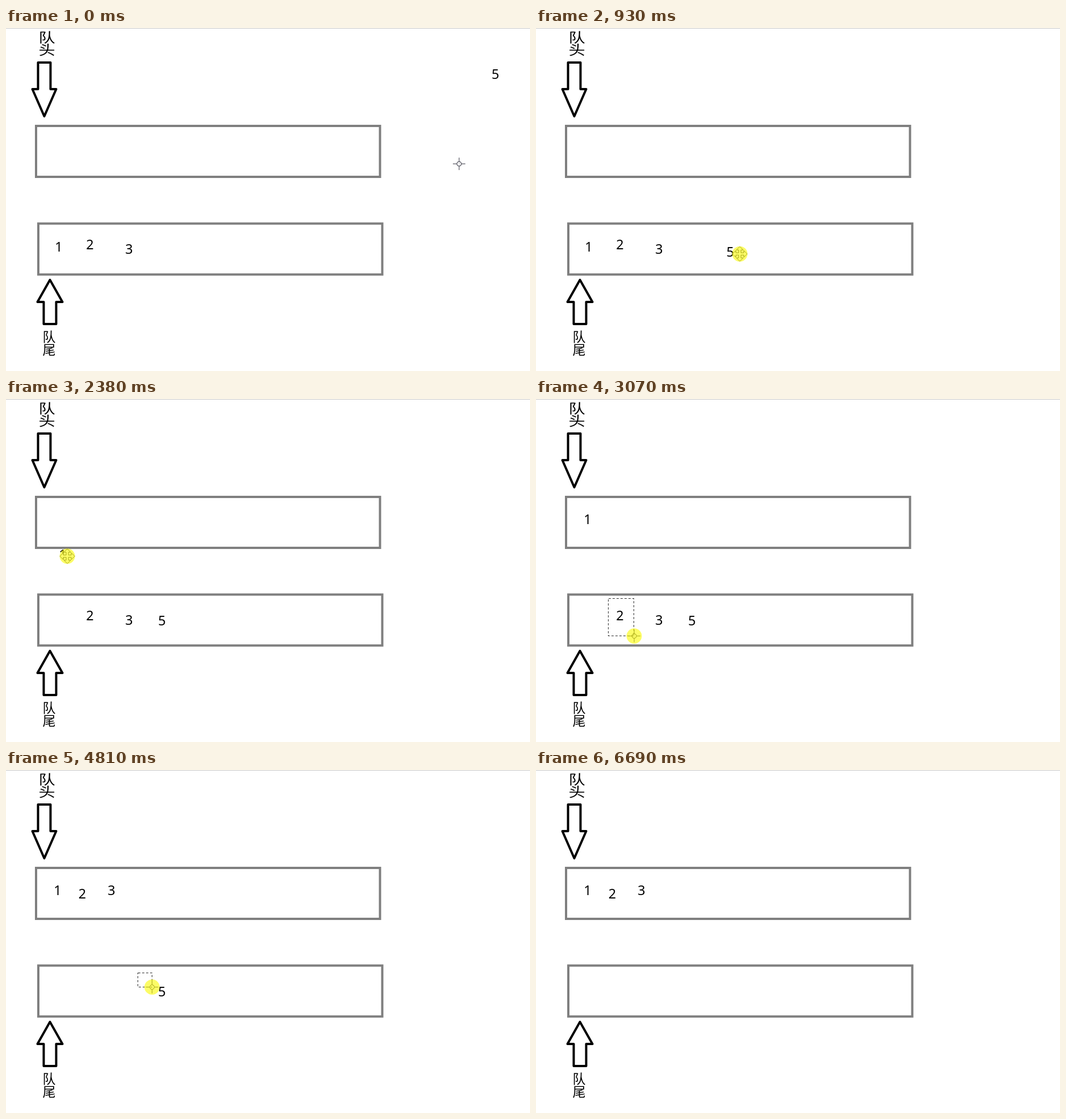
Animation, 924 px wide and 606 px high, one loop 7720 ms. Source, as an HTML page:

```html
<!DOCTYPE html>
<html lang="zh">
<head>
<meta charset="utf-8">
<title>Queue with two arrays</title>
<style>
  html, body { margin: 0; width: 100%; height: 100%; overflow: hidden; background: #fff; }
  svg { display: block; width: 924px; height: 606px; }
  text { text-anchor: middle; fill: #000; }
  .label { font: 23px "Noto Sans CJK SC", "Noto Sans CJK", sans-serif; }
  .digit { font: 23.5px "Noto Sans", "Open Sans", sans-serif; }
  .slot { fill: none; stroke: #7f7f7f; stroke-width: 4; }
  .arrow { fill: #fff; stroke: #000; stroke-width: 4; stroke-linejoin: round; }
  .marquee { fill: none; stroke-dasharray: 4 3; shape-rendering: crispEdges; }
  .handle { fill: #fff; stroke: #444; shape-rendering: crispEdges; }
  .cursor { fill: none; stroke: #333340; }
  .cursor .solid { fill: #fff; }
</style>
</head>
<body>
<svg viewBox="0 0 924 606">
  <rect width="924" height="1" fill="#c8c8c8"/>
  <g class="label">
    <g transform="translate(72 0) scale(1.27 1)"><text y="25">队</text><text y="47">头</text></g>
    <text x="76" y="553.5">队</text><text x="76" y="576.5">尾</text>
  </g>
  <rect class="slot" x="53" y="173" width="606.5" height="90"/>
  <rect class="slot" x="57" y="345.5" width="606.5" height="90"/>
  <path class="arrow" d="M56.5 61H78.5V108H88.5L67.5 156L46.5 108H56.5Z"/>
  <path class="arrow" d="M77.5 445L99.5 484H88.5V523H66.5V484H55.5Z"/>
  <g id="digits" class="digit"></g>
  <g id="selection"><rect class="marquee"/><g id="handles"></g></g>
  <g id="pointer">
    <g class="cursor" id="cross">
      <circle r="4"/><path d="M-11 0H-4M4 0H11M0-11V-4M0 4V11M-.5 0H.5"/>
    </g>
    <g class="cursor" id="move">
      <path class="solid" d="M0-13L6-7H2V-2H7V-6L13 0L7 6V2H2V7H6L0 13L-6 7H-2V2H-7V6L-13 0L-7-6V-2H-2V-7H-6Z"/>
    </g>
    <g class="cursor" id="resize">
      <path class="solid" d="M0-13L6-7H2.5V7H6L0 13L-6 7H-2.5V-7H-6Z"/>
    </g>
    <circle id="press" r="13.5" fill="#fafa00" fill-opacity=".6"/>
  </g>
</svg>
<script>
const LOOP = 7720, EXIT = 6675, SVG = "http://www.w3.org/2000/svg";
const SWEEP = 230, REACH = 130, CARRY = .82;   // ms, ms, share of the held time
const WANDER = [110, 60];
const $ = id => document.getElementById(id);

const home = { 1: [93, 387], 2: [148, 383], 3: [217, 391], 5: [863, 82] };

// Each digit is framed (pad: left, top, right, bottom), gripped and carried along a bent path.
const drags = [
  { digit: 5, press: 150, drop: 1340, pad: [30, 58, 58, 48], grip: [17, 3], to: [275, 392], bend: [-73, 198] },
  { digit: 1, press: 1900, drop: 2590, pad: [23, 24], grip: [8, 3], to: [91, 212.5], bend: [20, 21] },
  { digit: 2, press: 2860, drop: 3500, pad: [20, 30], grip: [0, 15], to: [134.5, 218.5], bend: [0, 0] },
  { digit: 3, press: 3770, drop: 4520, pad: [30, 29], grip: [4, 17], to: [186, 212.5], bend: [14, 0] },
  { digit: 5, press: 4720, drop: 5620, pad: [42, 33, 29, 38], grip: [-2, 8], to: [83, 390], bend: [-57, 13] },
  { digit: 5, press: 5990, drop: 6720, pad: [38, 21], grip: [-7, 6], to: [300, 589], bend: [20, -20] }
];

const plus = (a, b) => a.map((v, i) => v + b[i % 2]);
const easeOut = k => 1 - (1 - k) ** 2;
const settle = k => 1 - (1 - k) ** 3;
const smooth = k => k * k * (3 - 2 * k);

const legs = [];
function leg(start, end, from, to, ease, bend = [0, 0]) {
  legs.push({ start, end, from, to, ease, bend });
}

function plan() {
  const spots = { ...home };
  let idleFrom = 30, rest = [799, 240];
  for (const drag of drags) {
    const { digit, press, drop, pad: [left, top, right = 26, bottom = 37], grip, to, bend } = drag;
    const spot = spots[digit], [x, y] = spot;
    const corner = [x - left, y - top], opposite = [x + right, y + bottom];
    drag.box = [...corner, ...opposite];
    drag.shift = [to[0] - x, to[1] - y];
    drag.release = press + SWEEP;
    drag.grab = drag.release + REACH;
    const hold = plus(spot, grip), target = plus(to, grip);
    leg(idleFrom, press, rest, corner, smooth, WANDER);
    leg(press, drag.release, corner, opposite, smooth);
    leg(drag.release, drag.grab, opposite, hold, settle);
    leg(drag.grab, drag.grab + (drop - drag.grab) * CARRY, hold, target, easeOut, bend);
    spots[digit] = to;
    idleFrom = drop;
    rest = target;
  }
}
plan();

function pointerAt(t) {
  const { start, end, from, to, ease, bend } = legs.filter(l => l.start <= t).pop() || legs[0];
  const s = ease(Math.min(1, Math.max(0, (t - start) / (end - start))));
  return from.map((v, i) => v + (to[i] - v) * s + 2 * s * (1 - s) * bend[i]);
}

function set(node, attrs) {
  for (const name in attrs) node.setAttribute(name, attrs[name]);
}
function add(parent, tag, attrs = {}) {
  const node = document.createElementNS(SVG, tag);
  set(node, attrs);
  return parent.appendChild(node);
}
const show = (node, on) => set(node, { display: on ? "inline" : "none" });

const digits = {};
for (const d in home) (digits[d] = add($("digits"), "text")).textContent = d;
const marquee = document.querySelector(".marquee");
const handles = [];
for (let i = 0; i < 9; i++) {
  if (i !== 4) handles.push({
    u: i % 3 / 2, v: Math.floor(i / 3) / 2,
    node: add($("handles"), "rect", { class: "handle", width: 3, height: 3 })
  });
}

function drawSelection(box, live) {
  show($("selection"), box);
  if (!box) return;
  const [x0, y0, x1, y1] = box.map(v => Math.round(v) - .5);
  set(marquee, { x: x0, y: y0, width: Math.max(0, x1 - x0), height: Math.max(0, y1 - y0),
                 stroke: live ? "#333" : "#2f8fd8" });
  show($("handles"), !live);
  for (const { u, v, node } of handles) {
    set(node, { x: Math.round(x0 + (x1 - x0) * u) - 1.5, y: Math.round(y0 + (y1 - y0) * v) - 1.5 });
  }
}

function draw(t) {
  const point = pointerAt(t), [px, py] = point;
  const spots = { ...home };
  let box = null, live = false, pressed = false, cursor = "cross";

  for (const { digit, press, release, grab, drop, box: frame, shift, grip, to } of drags) {
    if (t < press) break;
    live = t < release;
    pressed = live || (t >= grab && t < drop);
    cursor = "cross";
    if (live) {
      box = [frame[0], frame[1], px, py];
    } else if (t < grab) {
      box = frame;
      cursor = px > frame[2] - 4 ? "cross" : "resize";
    } else if (t < drop) {
      box = null;
      cursor = "move";
      spots[digit] = [px - grip[0], py - grip[1]];
    } else {
      box = plus(frame, shift);
      spots[digit] = to;
      if (px > box[0] && px < box[2] && py > box[1] && py < box[3]) cursor = "move";
    }
  }

  for (const d in spots) set(digits[d], { x: spots[d][0], y: spots[d][1] + 8 });
  const present = t < EXIT;
  show(digits[5], present);
  show($("pointer"), present);
  drawSelection(present && box, live);
  set($("pointer"), { transform: `translate(${px} ${py})` });
  for (const name of ["cross", "move", "resize"]) show($(name), name === cursor);
  show($("press"), pressed);
}

const start = performance.now();
function tick() {
  draw((performance.now() - start) % LOOP);
  requestAnimationFrame(tick);
}
tick();
</script>
</body>
</html>
```
